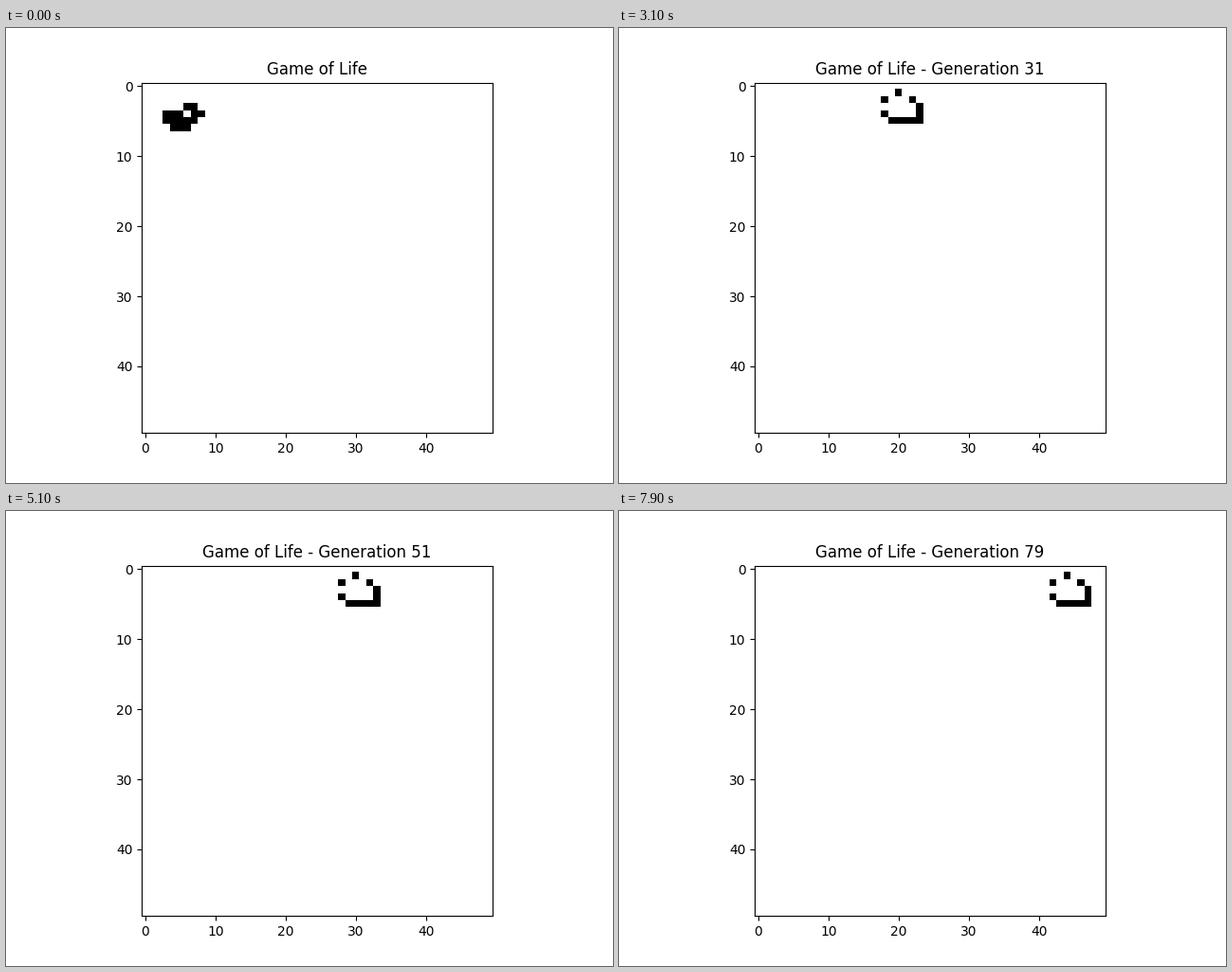
Write a matplotlib script that moves like this. It is 640 by 480 pixels and loops after 8000 ms.

```python
import matplotlib.pyplot as plt
import numpy as np
from matplotlib.animation import FuncAnimation

SIZE = 50
GENERATIONS = 80
INTERVAL = 100  # ms

# Middleweight spaceship travelling right
SHIP = [
    "...##.",
    "###.##",
    "#####.",
    ".###..",
]
TOP, LEFT = 3, 3


def start_grid():
    grid = np.zeros((SIZE, SIZE), dtype=int)
    for r, row in enumerate(SHIP):
        for c, cell in enumerate(row):
            grid[TOP + r, LEFT + c] = cell == "#"
    return grid


def step(grid):
    neighbours = sum(
        np.roll(grid, (dy, dx), axis=(0, 1))
        for dy in (-1, 0, 1)
        for dx in (-1, 0, 1)
        if (dy, dx) != (0, 0)
    )
    alive = (neighbours == 3) | ((grid == 1) & (neighbours == 2))
    return alive.astype(int)


history = [start_grid()]
while len(history) < GENERATIONS:
    history.append(step(history[-1]))

fig, ax = plt.subplots(figsize=(6.4, 4.8), dpi=100)
image = ax.imshow(history[0], cmap="binary", vmin=0, vmax=1)
title = ax.set_title("Game of Life")


def update(gen):
    image.set_data(history[gen])
    suffix = f" - Generation {gen}" if gen else ""
    title.set_text("Game of Life" + suffix)
    return image, title


anim = FuncAnimation(fig, update, frames=GENERATIONS, interval=INTERVAL,
                     repeat=True, repeat_delay=0, blit=False)
plt.show()
```
